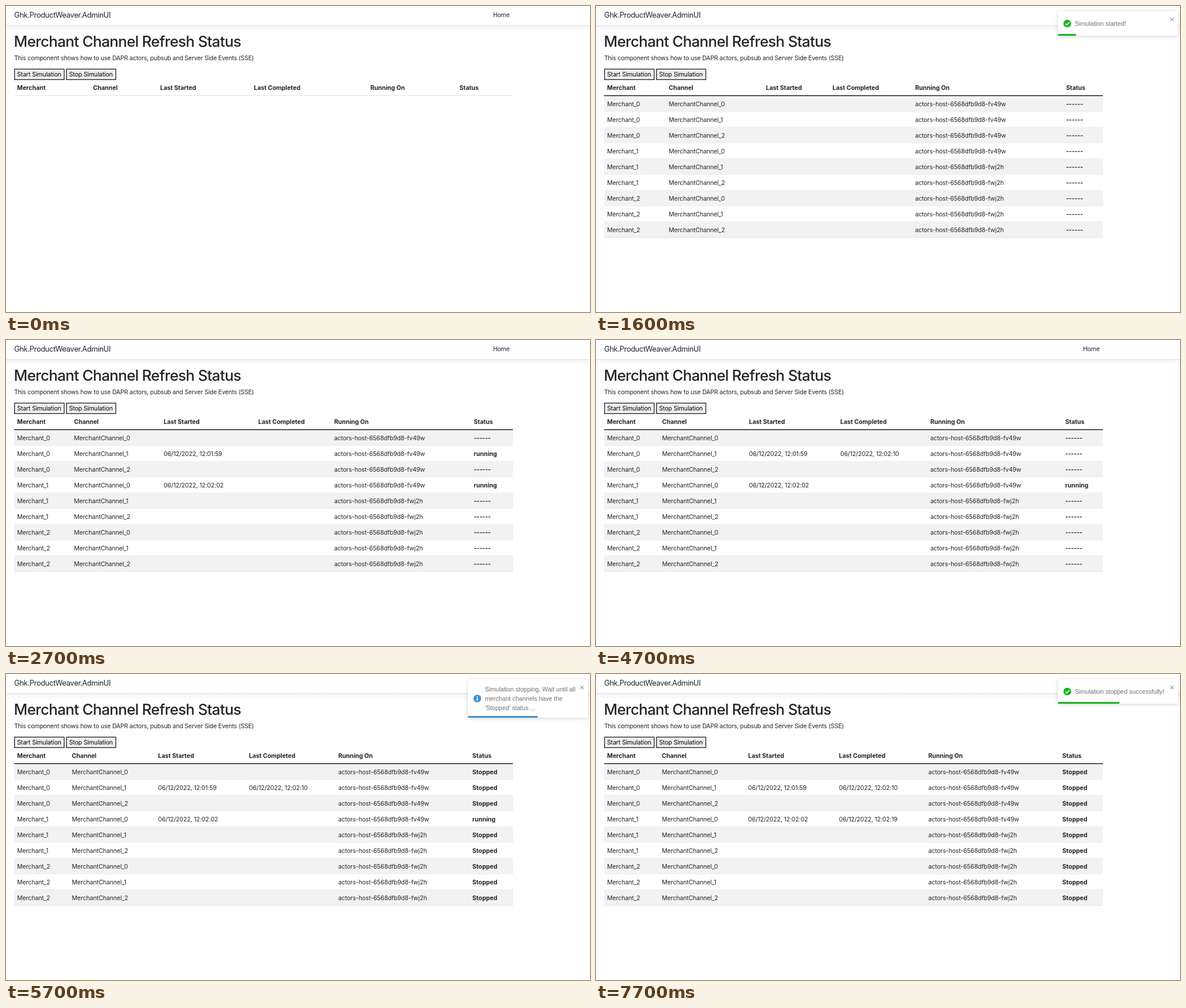
Write an HTML page that moves like this. It is 1000 px wide and 525 px high and loops after 7.8 s.

```html
<!DOCTYPE html>
<html lang="en">
<head>
<meta charset="utf-8">
<title>Refresh status</title>
<style>
  html, body { margin: 0; width: 100%; height: 100%; overflow: hidden; background: #fff; }
  svg { display: block; width: 1000px; height: 525px; }
  text {
    font: 10.4px Inter, "Open Sans", sans-serif;
    font-optical-sizing: none;
    letter-spacing: -.017em;
    fill: #212529;
    white-space: pre;
  }
  .brand { font-size: 12.8px; letter-spacing: -.032em; }
  .title { font-size: 25.6px; font-weight: 500; letter-spacing: -.7px; }
  .cell { letter-spacing: -.011em; }
  .bold { font-weight: 700; letter-spacing: 0; }
  .button rect { fill: #efefef; stroke: #222; stroke-width: 1.3; }
  .button text { fill: #000; letter-spacing: -.011em; }
  .card { fill: #fff; filter: drop-shadow(0 1px 3.3px rgba(0, 0, 0, .18)); }
  .note { font: 10.6px "Liberation Sans", Arial, sans-serif; letter-spacing: 0; fill: #707070; }
</style>
</head>
<body>
<svg viewBox="0 0 1000 525">
  <defs>
    <linearGradient id="shade" x2="0" y2="1">
      <stop offset="0" stop-color="#000" stop-opacity=".045"/>
      <stop offset=".5" stop-color="#000" stop-opacity=".018"/>
      <stop offset="1" stop-color="#000" stop-opacity="0"/>
    </linearGradient>
  </defs>
  <rect y="34" width="1000" height="11" fill="url(#shade)"/>
  <rect y="33" width="1000" height="1" fill="#dee2e6"/>
  <text class="brand" x="14" y="19.5">Ghk.ProductWeaver.AdminUI</text>
  <text x="834" y="18.6">Home</text>
  <text class="title" x="13.5" y="69.8">Merchant Channel Refresh Status</text>
  <text x="14" y="93">This component shows how to use DAPR actors, pubsub and Server Side Events (SSE)</text>
  <g class="button"><rect x="14.6" y="108.3" width="85" height="18"/><text x="19" y="121.2">Start Simulation</text></g>
  <g class="button"><rect x="103.6" y="108.3" width="84.4" height="18"/><text x="108" y="121.2">Stop Simulation</text></g>
  <g id="table"></g>
  <g id="toasts"></g>
  <path id="cursor" fill="#fff" stroke="#222" stroke-width=".9" stroke-linejoin="round"
    d="M-1.5 0V-4.5Q-.5-6 .5-4.5V-1.8L3.2-1.2Q4.4-.8 4.2 1L3.4 5H-1.6L-4 1.2Q-4.2-.4-2.8.2L-1.5 1.4Z"/>
</svg>
<script>
const LOOP = 7800, STEP = 100;
const GREEN = '#19b41f', BLUE = '#3f92d2';
const HEADS = ['Merchant', 'Channel', 'Last Started', 'Last Completed', 'Running On', 'Status'];
const day = time => '06/12/2022, ' + time;
const idle = Array(9).fill('------');
const stopped = Array(9).fill('Stopped');
const running = (base, ...rows) => base.map((s, i) => rows.includes(i) ? 'running' : s);

// Each state: start time, column positions, row statuses, started and completed times by row
const states = [
  { at: 0, cols: [19, 149, 264, 424.5, 624, 776.5] },
  { at: 100, cols: [19, 124.5, 291, 405, 546.5, 805], status: idle },
  { at: 1900, cols: [19, 117, 270.5, 432, 562, 801], status: running(idle, 1), started: { 1: '12:01:59' } },
  { at: 2700, cols: [19, 116.5, 270, 432, 562, 801], status: running(idle, 1, 3),
    started: { 1: '12:01:59', 3: '12:02:02' } },
  { at: 4700, cols: [19, 113.3, 262, 418.3, 572.5, 803.5], status: running(idle, 3),
    started: { 1: '12:01:59', 3: '12:02:02' }, completed: { 1: '12:02:10' } },
  { at: 5200, cols: [19, 112.8, 260.5, 416, 569, 798.5], status: running(stopped, 3),
    started: { 1: '12:01:59', 3: '12:02:02' }, completed: { 1: '12:02:10' } },
  { at: 7000, cols: [19, 112.8, 260.5, 416, 569, 798.5], status: stopped,
    started: { 1: '12:01:59', 3: '12:02:02' }, completed: { 1: '12:02:10', 3: '12:02:19' } }
];

const toasts = [
  { at: 589, color: GREEN, lines: ['Simulation started!'] },
  { at: 5200, color: BLUE,
    lines: ['Simulation stopping. Wait until all', 'merchant channels have the', "'Stopped' status ..."] },
  { at: 7117, color: GREEN, lines: ['Simulation stopped successfully!'] }
];
const LIFE = 1190, SLIDE = 175;

// Pointer stops: time, x, y; no position means hidden
const pointer = [[0], [200, 77, 117], [800, 150, 118], [900], [5100, 147, 118], [5400]];

const $ = id => document.getElementById(id);
const text = (x, y, s, cls) => `<text x="${x}" y="${y}" class="${cls}">${s}</text>`;
const rect = (x, y, w, h, fill) => `<rect x="${x}" y="${y}" width="${w}" height="${h}" fill="${fill}"/>`;
const latest = (list, t, time) => list.filter(item => time(item) <= t).pop();

function tableMarkup({ cols, status = [], started = {}, completed = {} }) {
  const rows = status.map((state, i) => {
    const top = 154.5 + 27 * i;
    const cells = [
      `Merchant_${Math.floor(i / 3)}`,
      `MerchantChannel_${i % 3}`,
      started[i] ? day(started[i]) : '',
      completed[i] ? day(completed[i]) : '',
      `actors-host-6568dfb9d8-${i < 4 ? 'fv49w' : 'fwj2h'}`,
      state
    ];
    return rect(14, top, 854, 27, i % 2 ? '#fff' : '#f2f2f2')
      + rect(14, top + 26.3, 854, .7, '#dee2e6')
      + cells.map((cell, c) => text(cols[c], top + 17.3, cell, c === 5 ? 'bold' : 'cell')).join('');
  }).join('');
  const line = status.length ? rect(14, 153, 854, 1.5, '#212529') : rect(14, 153, 854, 1, '#dee2e6');
  return HEADS.map((head, c) => text(cols[c], 144.2, head, 'bold')).join('') + rows + line;
}

function toastMarkup({ color, lines }) {
  const height = Math.max(42, 18 + 16 * lines.length);
  const middle = 9 + height / 2;
  const baseline = middle + 3.8 - 8 * (lines.length - 1);
  const mark = color === GREEN
    ? `<path d="M803.8 ${middle + .2}l2.5 2.5 4.2-5" fill="none" stroke="#fff" stroke-width="1.6"/>`
    : rect(806.1, middle - 1.2, 1.8, 4.8, '#fff') + rect(806.1, middle - 3.8, 1.8, 1.7, '#fff');
  return `<rect class="card" x="791" y="9" width="206" height="${height}" rx="2.6"/>`
    + `<g class="bar">${rect(791, 6 + height, 206, 3, color)}</g>`
    + `<circle cx="807" cy="${middle}" r="6.6" fill="${color}"/>${mark}`
    + '<path d="M983.2 20.2l6 6m0-6l-6 6" stroke="#a0a0a0" stroke-width="1.2"/>'
    + lines.map((s, i) => text(820, baseline + 16 * i, s, 'note')).join('');
}

const easeOut = p => 1 - (1 - p) ** 3;

function follow(stops, p) {
  const i = stops.findIndex(([offset]) => offset > p);
  if (i < 0) return stops[stops.length - 1][1];
  const [p0, x0] = stops[i - 1], [p1, x1] = stops[i];
  return x0 + (x1 - x0) * easeOut((p - p0) / (p1 - p0));
}

const slideIn = age => follow([[0, 2000], [.6, -17], [.75, 7], [.9, -3], [1, 0]], age / SLIDE);
const slideOut = age => follow([[0, 0], [.2, -13], [1, 1320]], age / SLIDE);

$('toasts').innerHTML = toasts.map(toast => `<g>${toastMarkup(toast)}</g>`).join('');
const toastNodes = [...$('toasts').children];
let shown;

function draw(t) {
  const state = latest(states, t, s => s.at);
  if (state !== shown) {
    shown = state;
    $('table').innerHTML = tableMarkup(state);
  }

  toasts.forEach(({ at }, i) => {
    const age = t - at, node = toastNodes[i];
    const visible = age >= 0 && age < LIFE + SLIDE;
    node.style.display = visible ? '' : 'none';
    if (!visible) return;
    const x = age < LIFE ? slideIn(age) : slideOut(age - LIFE);
    const left = Math.max(0, 1 - age / LIFE);
    node.setAttribute('transform', `translate(${x} 0)`);
    node.querySelector('.bar').setAttribute('transform', `translate(${791 * (1 - left)} 0) scale(${left} 1)`);
  });

  const [, x, y] = latest(pointer, t, p => p[0]);
  $('cursor').style.display = x ? '' : 'none';
  if (x) $('cursor').setAttribute('transform', `translate(${x} ${y})`);
}

const begin = performance.now();
function tick() {
  const t = (performance.now() - begin) % LOOP;
  draw(Math.floor(t / STEP) * STEP);
  requestAnimationFrame(tick);
}
tick();
</script>
</body>
</html>
```
